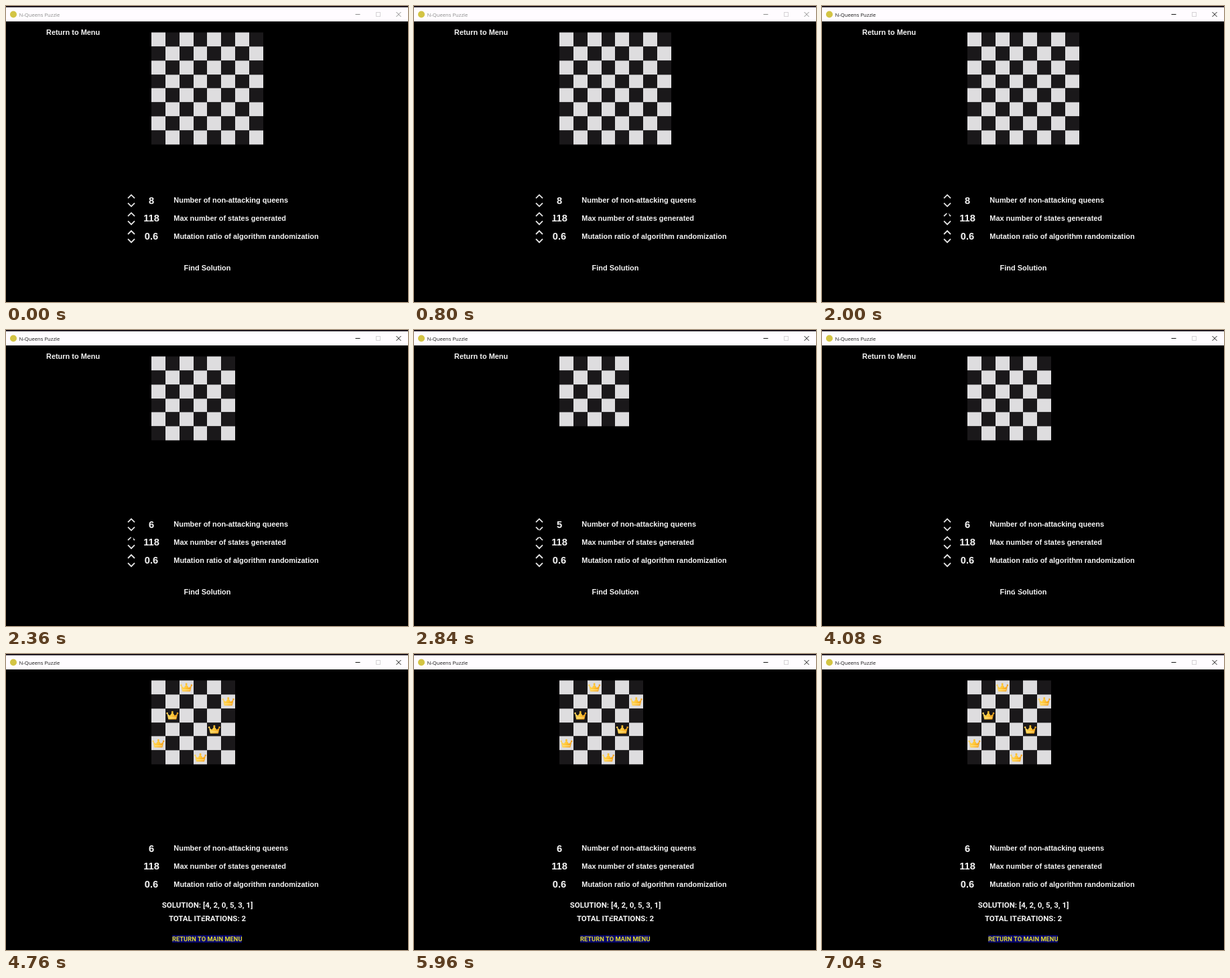
An HTML page with a canvas for the animation above (7200 ms loop, 600 by 441 pixels).

```html
<!DOCTYPE html>
<html lang="en">
<head>
<meta charset="utf-8">
<title>N-Queens Puzzle</title>
<style>
  html, body { margin: 0; width: 100%; height: 100%; overflow: hidden; background: #000; }
  canvas { display: block; }
</style>
</head>
<body>
<canvas id="stage" width="600" height="441"></canvas>
<script>
const ctx = document.getElementById('stage').getContext('2d');
const LOOP = 7200, ACTIVATED = 1920, SOLVED = 4360;
const CELL = 20.86, BOARD_X = 217, BOARD_Y = 39.4, ROW_GAP = 26.8;
const UI = '"Liberation Sans", Arial, sans-serif';
const SOLUTION = [4, 2, 0, 5, 3, 1];
const LABELS = ['Number of non-attacking queens', 'Max number of states generated',
                'Mutation ratio of algorithm randomization'];
// time, board size
const SIZES = [[0, 8], [2040, 7], [2320, 6], [2520, 5], [3280, 6]];
// time, x, y of the pointer tip
const POINTER = [[40, 344, 396], [780, 202, 301], [800, 202, 301], [1360, 185, 300], [1520, 185, 300],
                 [2000, 183, 298], [2320, 183, 298], [2520, 186, 297], [2840, 186, 297],
                 [3200, 184, 283], [3600, 184, 283], [4060, 287, 378]];

function text(str, x, y, font, color = '#f4f4f4', align = 'left') {
  ctx.font = font;
  ctx.fillStyle = color;
  ctx.textAlign = align;
  ctx.fillText(str, x, y);
}

function rect(x, y, w, h, color) {
  ctx.fillStyle = color;
  ctx.fillRect(x, y, w, h);
}

function line(points, color, width) {
  ctx.beginPath();
  points.forEach(([x, y]) => ctx.lineTo(x, y));
  ctx.strokeStyle = color;
  ctx.lineWidth = width;
  ctx.stroke();
}

function dot(x, y, r, color) {
  ctx.fillStyle = color;
  ctx.beginPath();
  ctx.arc(x, y, r, 0, 2 * Math.PI);
  ctx.fill();
}

function drawTitleBar(active) {
  const ink = active ? '#161616' : '#8c8c8c';
  rect(0, 0, 600, 2, '#211a22');
  rect(0, 2, 600, 21, '#fffcff');
  dot(11, 12.5, 5, '#d3c444');
  text('N-Queens Puzzle', 19.5, 15.5, '7.7px "Open Sans", "Noto Sans", sans-serif', ink);
  line([[521.5, 12.5], [528.5, 12.5]], ink, 1);
  ctx.strokeStyle = '#d6d3d6';
  ctx.strokeRect(552.5, 9.5, 6, 6);
  line([[582.5, 9], [589.5, 16]], ink, 1);
  line([[589.5, 9], [582.5, 16]], ink, 1);
}

function drawBoard(size) {
  const edge = i => Math.round(i * CELL);
  for (let row = 0; row < size; row++)
    for (let col = 0; col < size; col++)
      rect(BOARD_X + edge(col), BOARD_Y + edge(row), edge(col + 1) - edge(col), edge(row + 1) - edge(row),
           (row + col) % 2 ? '#1a181a' : '#dedddf');
}

function drawCrown(x, y) {
  const gold = ctx.createLinearGradient(-8, -3, 8, 4);
  gold.addColorStop(0, '#ffd96a');
  gold.addColorStop(0.45, '#ffc93c');
  gold.addColorStop(1, '#f39a16');
  ctx.save();
  ctx.translate(x, y);
  ctx.fillStyle = gold;
  ctx.fill(new Path2D('M-6 6L-8-3L-3.6 .3L0-5L3.6 .3L8-3L6 6Z'));
  dot(-7.7, -3.2, 1.3, '#ffd35a');
  dot(0, -5, 1.5, '#ffc02e');
  dot(7.7, -3.2, 1.3, '#f5a21c');
  line([[-5.6, 3.6], [5.6, 3.6]], '#ffe797', 1);
  ctx.restore();
}

function drawSettings(size, editable) {
  [size, '118', '0.6'].forEach((value, i) => {
    const y = 290 + i * ROW_GAP;
    text(value, 217, y + 4.6, 'bold 14.7px ' + UI, '#f4f4f4', 'center');
    text(LABELS[i], 250.3, y + 3.4, 'bold 10.95px ' + UI);
    if (!editable) return;
    for (const dir of [-1, 1])
      line([[182, y + dir * 3.6], [187, y + dir * 8.6], [192, y + dir * 3.6]], '#e6e6e6', 1.8);
  });
}

function drawResult() {
  SOLUTION.forEach((row, col) =>
    drawCrown(BOARD_X + (col + 0.5) * CELL, BOARD_Y + (row + 0.5) * CELL));
  const font = 'Roboto, "Open Sans", sans-serif';
  text(`SOLUTION: [${SOLUTION.join(', ')}]`, 300.5, 378, 'bold 11.5px ' + font, '#f4f4f4', 'center');
  text('TOTAL ITERATIONS: 2', 300.5, 398, 'bold 11.5px ' + font, '#f4f4f4', 'center');
  rect(248, 419, 104, 11, '#06066e');
  text('RETURN TO MAIN MENU', 300.3, 428, 'bold 9.3px ' + font, '#e2dc2c', 'center');
}

function pointerAt(t) {
  const next = POINTER.findIndex(key => key[0] > t);
  if (next < 1) return POINTER[next < 0 ? POINTER.length - 1 : 0].slice(1);
  const [t0, x0, y0] = POINTER[next - 1], [t1, x1, y1] = POINTER[next];
  const u = (t - t0) / (t1 - t0), k = u * u * (3 - 2 * u);
  return [x0 + (x1 - x0) * k, y0 + (y1 - y0) * k];
}

// The pointer is black, so it only shows where it covers something.
function drawPointer([x, y]) {
  ctx.save();
  ctx.translate(x, y);
  ctx.fillStyle = '#000';
  ctx.fill(new Path2D('M0 0V12.5L3 10L5 14.5L7 13.5L5.2 9.4H9Z'));
  ctx.restore();
}

function draw(now) {
  const t = now % LOOP, solved = t >= SOLVED;
  const size = SIZES.filter(([start]) => start <= t).pop()[1];
  rect(0, 0, 600, 441, '#000');
  drawTitleBar(t >= ACTIVATED);
  drawBoard(size);
  drawSettings(size, !solved);
  if (solved) {
    drawResult();
  } else {
    text('Return to Menu', 60, 42.8, 'bold 10.95px ' + UI);
    text('Find Solution', 300.5, 393.6, 'bold 10.95px ' + UI, '#f4f4f4', 'center');
  }
  drawPointer(pointerAt(t));
  requestAnimationFrame(draw);
}
requestAnimationFrame(draw);
</script>
</body>
</html>
```
